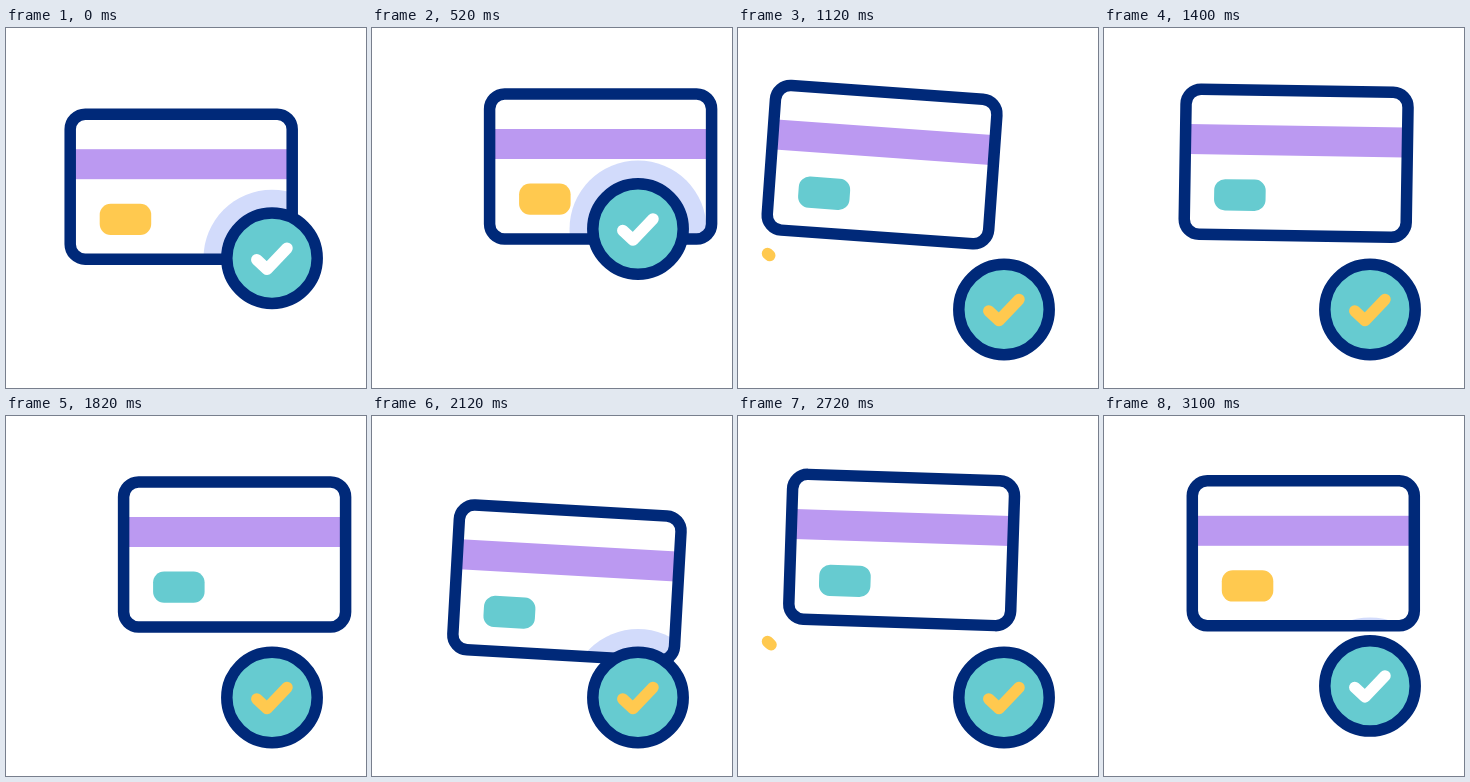
Animation of 360x360 px, one loop 3.12 s. Source, as an HTML page:

```html
<!DOCTYPE html>
<html lang="en">
<head>
<meta charset="utf-8">
<title>Card payment</title>
<style>
  html, body { margin: 0; width: 100%; height: 100%; overflow: hidden; background: #fff; }
  svg { display: block; width: 100vw; height: 100vh; }
  .line { fill: none; stroke-width: 11.5; stroke-linecap: round; stroke-linejoin: round; }
  .navy { stroke: #002979; }
</style>
</head>
<body>
<svg viewBox="0 0 360 360">
  <defs>
    <clipPath id="inside"><rect id="window" x="-111" y="-72.5" width="222" height="145" rx="15"/></clipPath>
  </defs>
  <g id="card">
    <rect x="-111" y="-72.5" width="222" height="145" rx="15" fill="#fff"/>
    <rect x="-108" y="-37.5" width="216" height="30" fill="#bb99f1"/>
    <rect id="chip" x="-81.5" y="17" width="51.5" height="31.3" rx="11"/>
  </g>
  <g clip-path="url(#inside)"><circle id="halo" cx="266" r="68.5" fill="#d2dbfb"/></g>
  <rect id="frame" class="line navy" x="-111" y="-72.5" width="222" height="145" rx="15"/>
  <path id="trail" class="line" stroke="#ffc94f" pathLength="1" d="M141 241.5C108 259 62 257 29.5 225.5"/>
  <g id="badge">
    <circle class="line navy" r="45.2" style="fill:#66cbd0"/>
    <path id="check" class="line" d="M-15.2 1.5L-5 11L15 -10"/>
  </g>
</svg>
<script>
const LOOP = 3120;
const YELLOW = '#ffc94f', TEAL = '#66cbd0';
const [card, hole, halo, frame, trail, badge, chip, check] =
  ['card', 'window', 'halo', 'frame', 'trail', 'badge', 'chip', 'check']
    .map(id => document.getElementById(id));

const clamp = u => Math.min(Math.max(u, 0), 1);

// Smooth curve through [time, value] keys that never overshoots them.
function curve(keys) {
  const last = keys.length - 1;
  const slope = i => (keys[i + 1][1] - keys[i][1]) / (keys[i + 1][0] - keys[i][0]);
  const tangent = i => {
    if (i === 0 || i === last) return 0;
    const a = slope(i - 1), b = slope(i);
    return a * b <= 0 ? 0 : 2 * a * b / (a + b);
  };
  return t => {
    if (t <= keys[0][0]) return keys[0][1];
    if (t >= keys[last][0]) return keys[last][1];
    const i = keys.findIndex(k => k[0] > t) - 1;
    const [t0, v0] = keys[i], [t1, v1] = keys[i + 1];
    const d = t1 - t0, u = (t - t0) / d, w = 1 - u;
    return v0 * (1 + 2 * u) * w * w + v1 * u * u * (3 - 2 * u)
      + d * u * w * (tangent(i) * w - tangent(i + 1) * u);
  };
}

// Card poses: centre x, centre y, turn in degrees.
const rest = [175.2, 158.7, 0], back = [168.3, 162, 0], right = [228.6, 138.5, 0];
const low = [157, 184.7, 5.8], left = [136, 158, 6.2], top_ = [144, 136.7, 4.1];
const over = [163.5, 134, 1.9], end = [199.3, 137.3, 0];

const swing = (start, span) => [
  [start, low], [start + span * 0.33, left], [start + span * 0.742, top_], [start + span, over]];

const route = [
  [180, rest], [270, back], [490, right], [560, right], ...swing(775, 465),
  [1700, right], [1850, right], ...swing(2320, 400), [3020, end]];

const [cardX, cardY, cardTurn] = [0, 1, 2].map(axis =>
  curve(route.map(([time, pose]) => [time, pose[axis]])));

const badgeY = curve([[180, 230.2], [270, 236], [490, 201], [580, 201], [850, 281.5],
  [2930, 281.5], [3170, 267]]);

const isTeal = t => (t >= 1000 && t < 2180) || (t >= 2520 && t < 3000);

// The trail is drawn by each swing, then wiped from behind.
const trailStarts = [560, 2180];
const trailHead = age => clamp(age / 210);
const trailTail = age => 1 - (1 - clamp((age - 130) / 512)) ** 2;

function drawTrail(t) {
  const age = t - trailStarts.findLast(s => t >= s);
  const tail = trailTail(age), length = trailHead(age) - tail;
  trail.style.display = length > 0.01 ? '' : 'none';
  trail.setAttribute('stroke-dasharray', `${Math.max(length, 0)} 2`);
  trail.setAttribute('stroke-dashoffset', -tail);
}

function draw(t) {
  const pose = `translate(${cardX(t)} ${cardY(t)}) rotate(${cardTurn(t)})`;
  for (const part of [card, hole, frame]) part.setAttribute('transform', pose);

  const y = badgeY(t);
  badge.setAttribute('transform', `translate(266 ${y})`);
  halo.setAttribute('cy', y);

  const teal = isTeal(t);
  chip.setAttribute('fill', teal ? TEAL : YELLOW);
  check.setAttribute('stroke', teal ? YELLOW : '#fff');
  drawTrail(t);
}

const begin = performance.now();
function tick() {
  draw((performance.now() - begin) % LOOP);
  requestAnimationFrame(tick);
}
tick();
</script>
</body>
</html>
```
